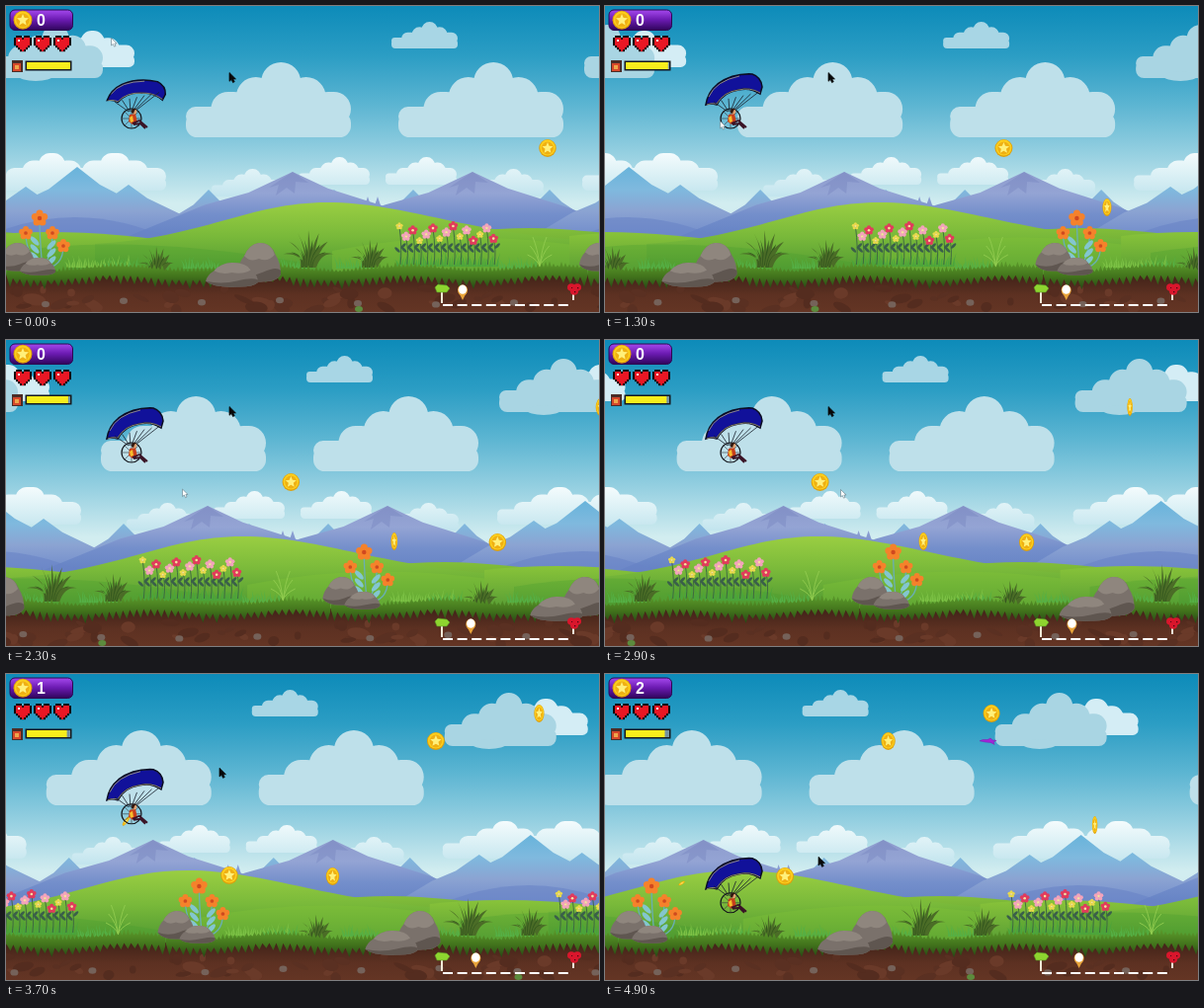
Animation of 600x310 px, one loop 5 s. Source, as an HTML page with a canvas:

```html
<!DOCTYPE html>
<html lang="en">
<head>
<meta charset="utf-8">
<title>Paraglider game</title>
<style>
html, body { margin: 0; width: 100%; height: 100%; overflow: hidden; }
canvas { display: block; }
</style>
</head>
<body>
<canvas id="stage" width="600" height="310"></canvas>
<script>
const c = document.getElementById('stage').getContext('2d');
const LOOP = 5000, STEP = 100, BACK = 600, FRONT = 588, FLOOR = 238;

function randomizer(seed) {
  return () => (seed = (seed * 16807) % 2147483647) / 2147483647;
}

function grad(y0, y1, ...stops) {
  const g = c.createLinearGradient(0, y0, 0, y1);
  stops.forEach((s, i) => g.addColorStop(i / (stops.length - 1), s));
  return g;
}

function box(x, y, w, h, fill) {
  c.fillStyle = fill;
  c.fillRect(x, y, w, h);
}

function oval(x, y, rx, ry, fill, turn = 0) {
  c.beginPath();
  c.ellipse(x, y, rx, ry, turn, 0, 7);
  c.fillStyle = fill;
  c.fill();
}

function shape(d, fill, stroke, width = 1) {
  const p = new Path2D(d);
  if (fill) { c.fillStyle = fill; c.fill(p); }
  if (stroke) { c.strokeStyle = stroke; c.lineWidth = width; c.stroke(p); }
}

function at(x, y, draw, sx = 1, sy = sx, turn = 0) {
  c.save();
  c.translate(x, y);
  c.rotate(turn);
  c.scale(sx, sy);
  draw();
  c.restore();
}

function tile(width, shift, draw) {
  for (const k of [-1, 0, 1]) at(k * width - shift, 0, draw);
}

// Rounded columns that rise to one peak, on a flat band
function cloud(x, base, w, h, fill) {
  c.beginPath();
  c.roundRect(x, base - h * .34, w, h * .34, h * .15);
  for (let u = .12; u < .9; u += .152) {
    const top = 1 - 1.3 * Math.abs(u - .576);
    c.roundRect(x + (u - .12) * w, base - top * h, w * .24, (top - .15) * h, Math.min(w * .12, h * .3));
  }
  c.fillStyle = fill;
  c.fill();
}

function skyClouds() {
  cloud(30, 62, 100, 37, '#d4edf5');
  cloud(-15, 73, 113, 54, '#a9d5e3');
  oval(30, 71, 17, 5, '#a9d5e3');
  cloud(182, 133, 167, 76, '#bee0ea');
  cloud(397, 133, 167, 76, '#bee0ea');
  cloud(390, 43, 67, 27, '#a8d6e5');
}

function lowClouds() {
  const white = grad(148, 192, '#f5fcfd', '#c3e5ee');
  cloud(-17, 187, 110, 38, white);
  cloud(40, 187, 122, 38, white);
  for (let i = 0; i < 4; i++) cloud(208 + i * 88, i % 3 ? 181 : 193, 72, 28, white);
}

function peak(x, y, half, fill) {
  shape(`M${x - half} ${FLOOR}L${x - half * .5} ${y + (FLOOR - y) * .48}L${x - half * .25} ${y + (FLOOR - y) * .3}L${x} ${y}L${x + half * .2} ${y + (FLOOR - y) * .24}L${x + half * .55} ${y + (FLOOR - y) * .52}L${x + half} ${FLOOR}Z`, fill);
}

function mountains() {
  const far = grad(164, 230, '#69b4db', '#7fb9de', '#8ba3d2', '#748fcc');
  const near = grad(168, 232, '#8d9bcd', '#94a4d4', '#748fcb', '#6683c5');
  for (const x of [205, 332, 412, 550]) peak(x, 186, 62, far);
  peak(20, 183, 95, far);
  peak(124, 181, 95, far);
  peak(72, 163, 115, far);
  for (const x of [290, 472]) {
    peak(x, 168, 178, near);
    shape(`M${x} 168l-24 16 10-3-3 11 11-8 8 6 1-12 13 1Z`, 'rgba(112,126,185,.35)');
  }
  for (const x of [366, 376]) peak(x, 193, 18, near);
  shape(`M-30 ${FLOOR}Q70 190 170 ${FLOOR}Z`, 'rgba(105,132,198,.6)');
}

function hills() {
  shape('M-30 233Q70 222 190 242V275H-30Z', grad(226, 270, '#8cc63a', '#5a9f35'));
  shape('M390 240Q490 221 560 226T640 236V275H390Z', grad(222, 268, '#86c03a', '#549a33'));
  shape('M90 241C200 235 245 199 325 199C405 199 470 232 600 238V275H90Z', grad(199, 268, '#9ace42', '#79b93a', '#529b32'));
  shape('M330 248Q460 222 600 246V275H330Z', 'rgba(130,195,55,.35)');
  shape('M0 250Q120 229 300 260V275H0Z', 'rgba(72,155,48,.3)');
}

function tuft(x, y, w, h, fill) {
  const r = randomizer(x + 7);
  for (let a = x; a < x + w; a += 2.4) {
    const lean = r() * 8 - 4;
    shape(`M${a - 1} ${y}Q${a} ${y - h * .4} ${a + lean} ${y - h * (.4 + r() * .6)}Q${a + 1} ${y - h * .4} ${a + 1.2} ${y}Z`, fill);
  }
}

function bush(x, y, size) {
  for (let i = -6; i <= 6; i++) {
    const a = i * .2, len = size * (i % 2 ? .8 : 1.05);
    const tx = x + Math.sin(a) * len * .72, ty = y - Math.cos(a) * len;
    shape(`M${x + i - 2} ${y}Q${x + i} ${y - len * .5} ${tx} ${ty}Q${x + i * 1.6 + 3} ${y - len * .4} ${x + i + 2} ${y}Z`, i % 2 ? '#35581f' : '#4b6c27');
  }
}

// Rock outline fitted to a box
function rock(x, y, w, h) {
  at(x, y, () => {
    shape('M0 .75Q.03 .5 .16 .33Q.28 .03 .5 0Q.78 -.01 .88 .3Q1 .5 1 .8Q.9 1 .6 .98Q.15 1.02 0 .75Z', '#7a716b');
    shape('M.16 .33Q.28 .03 .5 0Q.78 -.01 .86 .3Q.7 .5 .5 .4Q.3 .5 .16 .33Z', '#8f867e');
    shape('M0 .75Q.3 .9 .6 .74T1 .7V.8Q.9 1 .6 .98Q.15 1.02 0 .75Z', '#5f5650');
  }, w, h);
}

function bloom(x, y, r, fill, heart) {
  for (let a = -1.57; a < 4.5; a += 1.257) oval(x + Math.cos(a) * r * .6, y + Math.sin(a) * r * .6, r * .43, r * .43, fill);
  oval(x, y, r * .27, r * .27, heart);
}

function orangeFlowers() {
  const heads = [[34, 215], [20, 230], [47, 230], [58, 243]];
  for (const [x, y] of heads) shape(`M37 266Q${x} ${y + 22} ${x} ${y}`, null, '#6aaeb4', 1.3);
  for (let i = 0; i < 6; i++) oval(37 + (i % 2 ? 9 : -8), 238 + i * 4, 6, 2.4, '#83c6cf', i % 2 ? -.8 : .8);
  heads.forEach(([x, y], i) => bloom(x, y, i ? 6.8 : 8.2, '#f5822b', '#d2481e'));
}

function meadow() {
  tuft(396, 264, 102, 17, '#4aa53d');
  for (let i = 0; i < 15; i++) {
    const x = 398 + i * 6.8, y = 223 + i * 5 % 8 * 2.1;
    shape(`M${x} ${y}Q${x + 3} 247 ${x + 1} 262`, null, '#3c6442', .9);
    oval(x - 2, 247, 3.5, 1.4, '#3a5f4a', .8);
    oval(x + 4, 243, 3.5, 1.4, '#3a5f4a', -.8);
    bloom(x, y, i % 3 ? 4.8 : 3.6, ['#e9d94c', '#f3a3bb', '#e23a5c'][i % 3], '#f8dfa0');
  }
}

function fern(x, y) {
  for (const s of [-1, 1]) {
    for (const h of [12, 21, 30]) shape(`M${x} ${y}Q${x + s * 2} ${y - h * .6} ${x + s * (16 - h * .3)} ${y - h}`, null, '#92cc50', .9);
  }
}

function plants() {
  tuft(62, 265, 64, 14, '#7cc145');
  for (const x of [100, 180, 270, 335, 500]) tuft(x, 266, 36, 13, '#55b046');
  fern(540, 264);
  bush(152, 270, 25);
  bush(306, 265, 36);
  bush(368, 265, 27);
  meadow();
  orangeFlowers();
}

function soil() {
  const r = randomizer(77), edge = x => 272 + 2.5 * Math.sin(x * Math.PI * 8 / FRONT);
  box(0, 272, FRONT + 1, 38, grad(276, 310, '#46251a', '#5d3122', '#643524'));
  for (let i = 0; i < 45; i++) {
    oval(8 + r() * 572, 286 + r() * 23, 3 + r() * 9, 2 + r() * 4, ['#542c1f', '#6a3a29', '#5a3022'][i % 3], r() - .5);
  }
  for (let x = 40; x < FRONT; x += 79) oval(x, 293 + r() * 14, 4, 3.2, '#75625a');
  oval(357, 307, 4, 3, '#5c8b3d');
  let d = 'M0 272';
  for (let x = 0; x < FRONT; x += 4) d += `L${x + 2} ${edge(x) - 7 - r() * 4}L${x + 4} ${edge(x) - 5}`;
  for (let x = FRONT; x > 0; x -= 7) d += `L${x} ${edge(x) + 3}L${x - 3} ${edge(x) + 8 + r() * 5}`;
  shape(d + 'Z', grad(262, 286, '#579328', '#42741c', '#294a15'));
}

function rocks() {
  rock(234, 240, 44, 40);
  rock(202, 260, 53, 25);
  rock(-8, 240, 37, 29);
  rock(14, 255, 36, 18);
}

function star(r, fill) {
  c.beginPath();
  for (let i = 0; i < 10; i++) {
    const a = i * Math.PI / 5 - Math.PI / 2, q = i % 2 ? r * .45 : r;
    c.lineTo(Math.cos(a) * q, Math.sin(a) * q);
  }
  c.fillStyle = fill;
  c.fill();
}

function coin() {
  oval(0, 0, 9, 9, '#dfa00c');
  oval(0, -.4, 8, 8, '#fccf1d');
  oval(0, 0, 6.3, 6.5, '#efb013');
  star(6, '#fff07a');
}

// Height and spin phase of each coin, evenly spaced along the way
const coins = [[144, .3], [204, 2.1], [205, .9], [68, 1.8], [40, .6], [153, 2.6]];
const coinX = (i, shift) => 548 + 104.5 * i - shift;

// A coin shrinks and tips over as it passes the pilot
function drawCoins(t, shift) {
  coins.forEach(([y, phase], i) => {
    const x = coinX(i, shift), p = Math.min(1, Math.max(0, (150 - x) / 45));
    if (x < 75) return;
    const w = .3 + .7 * Math.abs(Math.cos(Math.PI * (t * 10 - phase) / 3.2));
    at(x, y + 8 * p, coin, w * (1 - .8 * p), 1 - .6 * p, p);
  });
}

function wing() {
  shape('M-26 0Q-24 -13 -14 -21Q1 -32 21 -31Q30 -28 31 -18L29 -11Q19 -18 7 -15Q-8 -13 -15 0Q-21 -2 -26 0Z', '#11119a', '#0b0d24', 1.6);
  shape('M-25 0Q-21 -2 -15 -1Q-8 -13 7 -15Q19 -18 29 -12M-23 -8Q-16 -24 8 -29', null, '#a9a184', .8);
}

function glider(t, drop) {
  const flat = Math.round(t * 10) % 6 === 0;
  at(128, 100 + drop, () => {
    at(0, 0, wing, 1, flat ? .88 : 1, flat ? .17 : 0);
    for (let i = 0; i < 7; i++) shape(`M${i * 7.5 - 18} ${-3 - i * 1.6}L${i - 4} 7`, null, '#18202d', .8);
    c.beginPath();
    c.arc(-1, 14, 10, 0, 7);
    c.strokeStyle = '#14161c';
    c.lineWidth = 1.2;
    c.stroke();
    for (let a = 0; a < 3; a += .785) {
      const x = Math.cos(a) * 10, y = Math.sin(a) * 10;
      shape(`M${x - 1} ${y + 14}L${-x - 1} ${14 - y}`, null, '#30353c', .6);
    }
    shape('M-3 10L3 9 5 18 0 20 -4 17Z', '#c8401c');
    shape('M-3 13L0 11 1 17 -2 18Z', '#f6bd2c');
    shape('M0 19L7 16 15 23M1 20L8 19 13 24', null, '#3a1426', 1.9);
    oval(2, 7, 2.3, 2.6, '#e0a06f');
    shape('M-1 8Q-1 3 4 4L2 6 1 9Z', '#31170f');
  });
}

function bird(t) {
  const flap = Math.sin(t * 8.6) > 0 ? 1 : -.4;
  at(526 - 197 * (t - 4.2), 106 - 54 * (t - 4.2), () => {
    shape('M-9 1L-3 -2 2 -3 6 -8 5 -2 8 2 4 3 2 8 -1 4 -6 4Z', '#a325d8', '#7f18b2', .7);
  }, 1, flap);
}

function pixelHeart(x, y) {
  const rows = (fill, inset) => {
    for (let i = inset; i < 8; i++) {
      const half = Math.min(i + 3.5, 4.5, 8.5 - i) - inset;
      if (half > 0) box(4.5 - half, i, half * 2, 1.1 - inset * .1, fill);
    }
  };
  at(x, y, () => {
    rows('#16060a', 0);
    rows('#e91724', 1);
    box(4, 0, 1, 1, '#55b3d0');
    box(4, 1, 1, 1, '#16060a');
    box(2, 2, 1, 1, '#fff');
  }, 2);
}

function hud(t, count) {
  c.beginPath();
  c.roundRect(4, 4, 63.5, 20.5, 5);
  c.fillStyle = grad(4, 24, '#a548ee', '#6a1ab0', '#32065f');
  c.fill();
  c.strokeStyle = '#2c0752';
  c.lineWidth = 1;
  c.stroke();
  at(17, 14.3, coin, 1.05);
  c.fillStyle = '#fff';
  c.font = 'bold 16px "Liberation Sans", Arial, sans-serif';
  c.fillText(count, 31, 20);
  for (const x of [8, 28, 48]) pixelHeart(x, 30);
  box(6, 55, 11, 12, '#4a2d28');
  box(7, 58, 8, 8, '#d5472a');
  box(9, 60, 4, 4, '#f0a54b');
  box(19.5, 55.5, 47, 10, '#17191c');
  box(21, 57, 44, 7, '#7593a1');
  box(21, 57, 44 - .92 * t, 7, '#f8ee1c');
}

function route(t) {
  c.setLineDash([10, 4.6]);
  shape('M442 303H569', null, '#fff', 2);
  c.setLineDash([]);
  shape('M441 290V301M574 291V298', null, '#f2ead8', 2);
  shape('M434 285L437 282 446 283 449 286 446 290 436 290Z', '#8ed52f', '#569728', .6);
  for (const [x, y] of [[572, 285], [578, 285], [575, 289]]) {
    oval(x, y, 4, 3.8, '#d9162c');
    box(x, y, 1.3, 1.3, '#4a0713');
  }
  at(462 + 3.6 * t, 288, () => {
    shape('M-4 2L0 10 4 2Z', '#e9a53b');
    oval(0, 0, 5, 5.6, '#e9a53b');
    oval(0, -.8, 4.2, 4.6, '#fff');
  });
}

function pointer(x, y, size, fill, stroke) {
  at(x, y, () => shape('M0 0V10L2.4 8 4 11.5 6 10.6 4.4 7.3H7.4Z', fill, stroke, .8), size);
}

function render(t) {
  const near = 109 * t + 1.7 * t * t, far = near / 3.02;
  const drop = 75 * Math.max(0, t - 3.33);

  box(0, 0, 600, 310, grad(0, 200, '#0d8bb9', '#2b9dc4', '#5cb5d2', '#96d0e1', '#d2edf0'));
  for (const layer of [skyClouds, lowClouds, mountains, hills]) tile(BACK, far, layer);
  for (const layer of [plants, soil, rocks]) tile(FRONT, near, layer);

  drawCoins(t, near);
  glider(t, drop);
  bird(t);
  hud(t, coins.filter((_, i) => coinX(i, near) < 145).length);
  route(t);

  // The white pointer dips first, then runs to the right
  if (t < 3.2) {
    const p = Math.max(0, (t - .8) / 2.1);
    pointer(106.5 + 132 * p ** 1.8, 32.5 + 119 * (1 - (1 - Math.min(1, p)) ** 4.5), .75, '#fff', '#5d7783');
  }
  pointer(226 - 10 * Math.min(1, drop / 27), 67.5 + drop, .88, '#080808', '#080808');
}

function frame(now) {
  render(Math.floor(now % LOOP / STEP) * STEP / 1000);
  requestAnimationFrame(frame);
}
requestAnimationFrame(frame);
</script>
</body>
</html>
```
